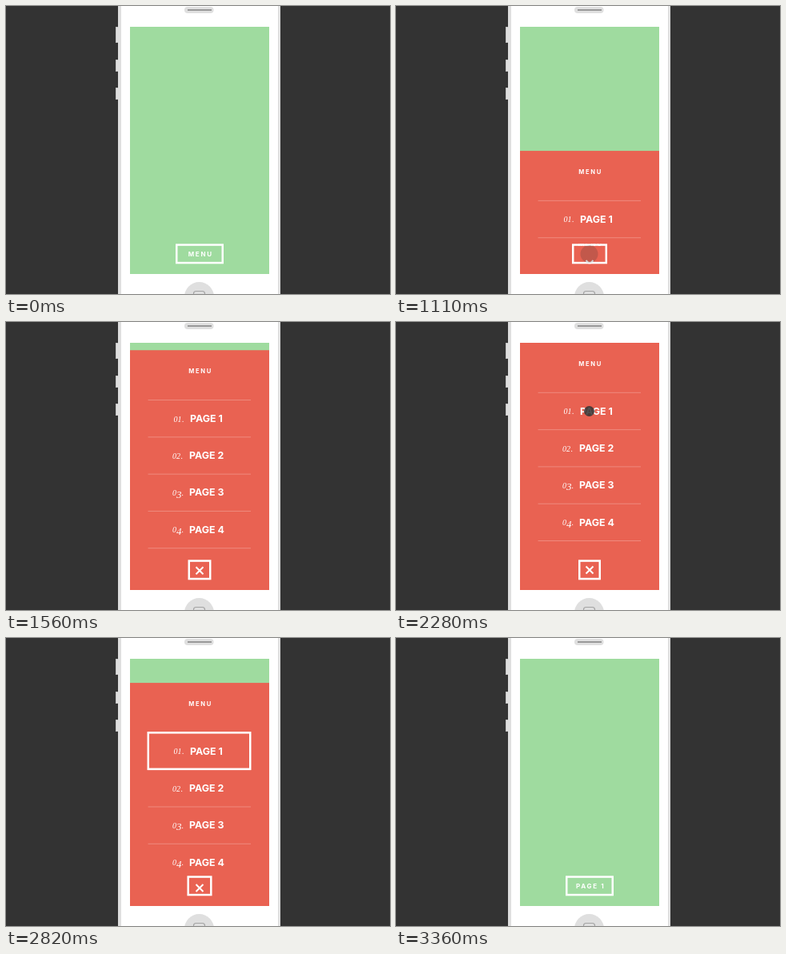
Recreate the animation shown at these times as an HTML page with a canvas. Size 480x360 px, loop 4.53 s.

```html
<!DOCTYPE html>
<html lang="en">
<head>
<meta charset="utf-8">
<title>Phone menu</title>
<style>
  html, body { margin: 0; height: 100%; overflow: hidden; background: #333; }
  canvas { display: block; }
</style>
</head>
<body>
<canvas id="stage" width="480" height="360"></canvas>
<script>
const c = document.getElementById('stage').getContext('2d');
const LOOP = 4530;
const GREEN = '#9fdb9f', RED = '#e96252', GREY = '#dfdfdf';
const SCREEN = { left: 155, top: 26, right: 329, bottom: 335 };
const ROW = 46.3, LIST_TOP = 62.3, MID = 242;

const clamp = v => Math.max(0, Math.min(1, v));
const progress = (t, start, duration) => clamp((t - start) / duration);

// Cubic Bézier easing with horizontal tangents at both ends
function ease(x, x1, x2) {
  let low = 0, high = 1;
  for (let i = 0; i < 24; i++) {
    const s = (low + high) / 2, r = 1 - s;
    if (3 * r * r * s * x1 + 3 * r * s * s * x2 + s ** 3 < x) low = s;
    else high = s;
  }
  return low * low * (3 - 2 * low);
}

function rect(x, y, w, h, fill) {
  c.fillStyle = fill;
  c.fillRect(x, y, w, h);
}

function rounded(x, y, w, h, r) {
  c.beginPath();
  c.roundRect(x, y, w, h, r);
}

function frame(x, y, w, h, width) {
  c.strokeStyle = '#fff';
  c.lineWidth = width;
  c.strokeRect(x + width / 2, y + width / 2, w - width, h - width);
}

function clipped(x, y, w, h, draw) {
  c.save();
  c.beginPath();
  c.rect(x, y, w, h);
  c.clip();
  draw();
  c.restore();
}

function text(str, x, y, font, align = 'left', spacing = 0) {
  c.font = font;
  c.textAlign = align;
  c.letterSpacing = spacing + 'px';
  c.fillStyle = '#fff';
  c.fillText(str, x, y);
}

const label = (str, y, size = 8) =>
  text(str, MID + 1.2, y + size * 0.36, `700 ${size}px Inter, sans-serif`, 'center', 1.7);

function phone() {
  rect(0, 0, 480, 360, '#333');
  for (const [y, h] of [[26, 20], [67, 15], [102, 15]]) {
    rect(137, y, 4, h, '#c4c4c4');
    rect(138, y + 1, 2, h - 2, GREY);
  }
  rect(140, 0, 203, 360, GREY);
  rect(144, 0, 196, 360, '#fff');

  c.fillStyle = GREY;
  rounded(223, 1, 36.5, 8, 4);
  c.fill();
  rect(227, 4, 30, 2, '#999');

  c.beginPath();
  c.arc(241.5, 363.5, 18.5, 0, 7);
  c.fillStyle = GREY;
  c.fill();
  c.strokeStyle = '#a3a3a3';
  c.lineWidth = 1.2;
  rounded(234.5, 356.5, 14, 14, 3);
  c.stroke();
}

// Old-style figures: 0-2 at x-height, 3 and 4 hang below the baseline
function rowNumber(n, x, y) {
  const hangs = n > 2;
  const font = size => `italic ${size}px "Liberation Serif", serif`;
  text('0', x, y, font(10));
  text(n, x + 5, y + (hangs ? 2.5 : 0), font(hangs ? 13 : 10));
  text('.', x + (hangs ? 11.5 : 10.5), y, font(11));
}

function menu(top, outline) {
  label('MENU', top + 26.5, 7.6);
  for (let i = 0; i < 5; i++) {
    const y = top + LIST_TOP + i * ROW;
    rect(177.5, y - 0.5, 128.5, 1, 'rgba(255,255,255,.25)');
    if (i == 4) break;
    rowNumber(i + 1, i ? 208 : 209.5, y + 27);
    text('PAGE ' + (i + 1), i ? 229 : 230, y + 27.3, '700 12.4px Inter, sans-serif');
  }
  c.globalAlpha = outline;
  frame(176.5, top + 61, 130, 48, 2.5);
  c.globalAlpha = 1;
}

function button(open, name) {
  const w = 60 - 32 * open, x = MID - w / 2, y = 297.3, h = 25;
  clipped(x, y, w, h, () => {
    label(name, 310 - 25 * open);
    const cy = 335 - 25 * open;
    c.strokeStyle = '#fff';
    c.lineWidth = 2;
    c.beginPath();
    for (const s of [-1, 1]) {
      c.moveTo(MID - 4.5, cy - 4.5 * s);
      c.lineTo(MID + 4.5, cy + 4.5 * s);
    }
    c.stroke();
  });
  frame(x, y, w, h, 2.5);
}

function tap(t, start, y) {
  const p = progress(t, start, 400);
  if (t < start || p == 1) return;
  c.beginPath();
  c.arc(241.5, y, 6.5 + 6 * p, 0, 7);
  c.fillStyle = `rgba(51,51,51,${0.86 * (1 - p)})`;
  c.fill();
}

function draw(t) {
  const open = ease(progress(t, 930, 860), 0.2, 0.03)
             - ease(progress(t, 2755, 610), 0.22, 0.2);
  const { left, top, right, bottom } = SCREEN;
  const width = right - left, sheet = bottom - (bottom - top) * open;

  phone();
  rect(left, top, width, bottom - top, GREEN);
  rect(left, sheet, width, bottom - sheet, RED);
  clipped(left, top, width, 297.5 - top, () => menu(sheet, progress(t, 2450, 290)));
  button(open, t < 2200 ? 'MENU' : 'PAGE 1');
  tap(t, 810, 310);
  tap(t, 2280, 111.5);
}

const begin = performance.now();
function tick() {
  draw((performance.now() - begin) % LOOP);
  requestAnimationFrame(tick);
}
tick();
</script>
</body>
</html>
```
